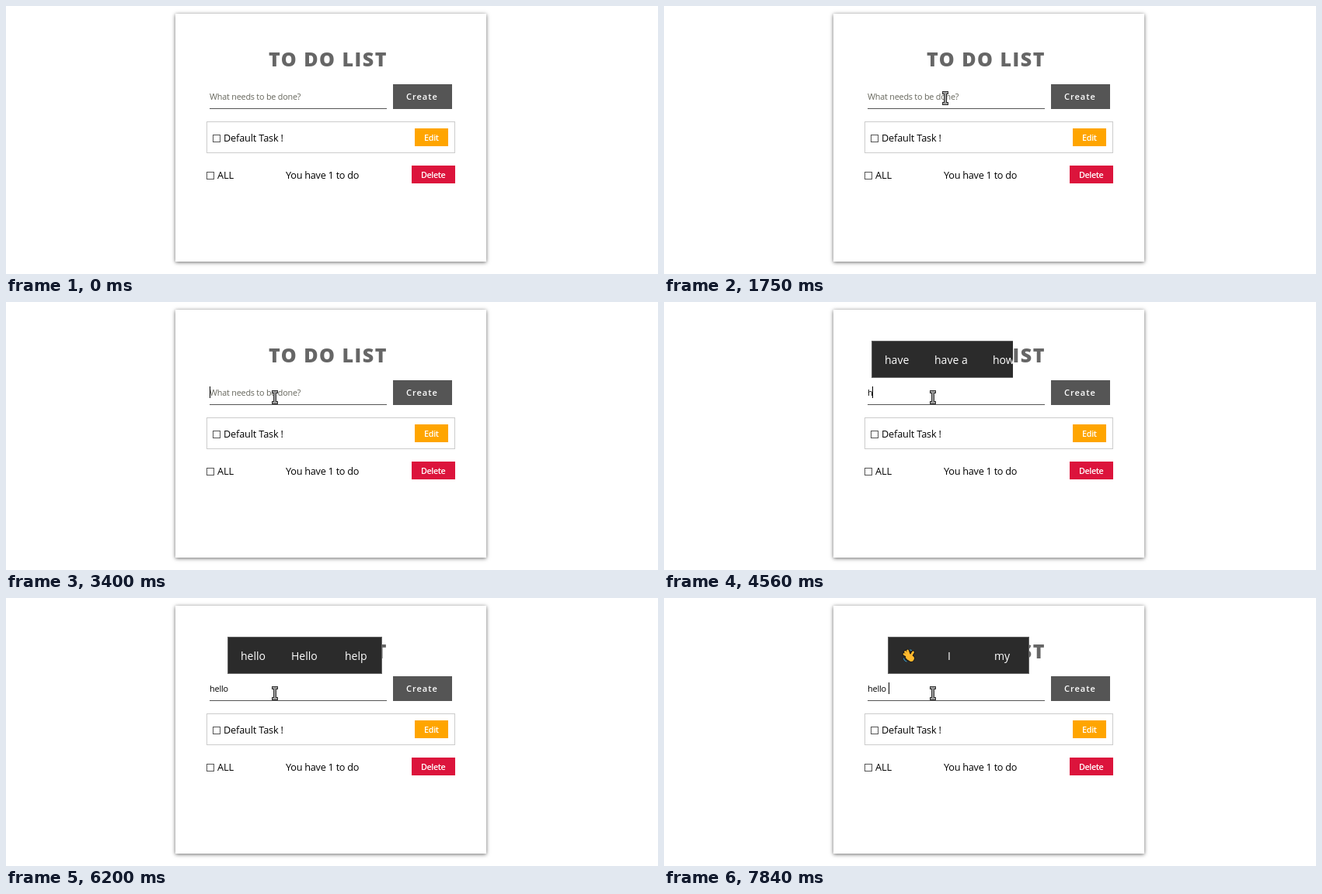
An HTML page with a canvas that plays this animation: 839x346 px, repeating every 8 s.

```html
<!DOCTYPE html>
<html lang="en">
<head>
<meta charset="utf-8">
<title>To do list</title>
<style>
  html, body { margin: 0; width: 100%; height: 100%; overflow: hidden; background: #fff; }
  canvas { display: block; width: 839px; height: 346px; }
</style>
</head>
<body>
<canvas id="stage"></canvas>
<script>
const W = 839, H = 346, LOOP = 8000;
const FONT = '"Open Sans", "Noto Sans", sans-serif';
const INPUT_X = 262;
const canvas = document.getElementById('stage');
const ctx = canvas.getContext('2d');
const scale = window.devicePixelRatio || 1;
canvas.width = W * scale;
canvas.height = H * scale;

function rect(x, y, w, h, color) {
  ctx.fillStyle = color;
  ctx.fillRect(x, y, w, h);
}

function frame(x, y, w, h, color) {
  ctx.strokeStyle = color;
  ctx.lineWidth = 1;
  ctx.strokeRect(x + 0.5, y + 0.5, w - 1, h - 1);
}

function setFont(size, weight, spacing) {
  ctx.font = `${weight} ${size}px ${FONT}`;
  ctx.letterSpacing = spacing + 'px';
}

function text(str, x, y, size, color, weight = 400, spacing = 0) {
  setFont(size, weight, spacing);
  ctx.fillStyle = color;
  ctx.fillText(str, x, y);
}

function line(points, width, color) {
  ctx.strokeStyle = color;
  ctx.lineWidth = width;
  ctx.lineCap = ctx.lineJoin = 'round';
  ctx.beginPath();
  points.forEach(([x, y]) => ctx.lineTo(x, y));
  ctx.stroke();
}

// Last entry of a [time, value] list that has started.
function at(list, t) {
  let value = list[0][1];
  for (const [start, v] of list) if (t >= start) value = v;
  return value;
}

function drawCard() {
  ctx.save();
  ctx.shadowColor = 'rgba(0,0,0,0.6)';
  ctx.shadowBlur = 5 * scale;
  ctx.shadowOffsetY = scale;
  rect(218, 10, 400, 320, '#fff');
  ctx.restore();

  text('TO DO LIST', 338, 78, 25, '#666', 800, 1.5);
  rect(262, 132, 228, 1, '#555');
  rect(498, 101, 76, 32, '#555');
  text('Create', 515, 121, 11, '#fff', 600, 1);

  frame(258, 149, 320, 41, '#ccc');
  frame(266, 166, 10, 10, '#555');
  text('Default Task !', 280, 175, 12.7, '#000', 400, -0.15);
  rect(526, 158, 43, 23, '#ffa500');
  text('Edit', 538, 174, 10.8, '#fff', 600, -0.3);

  frame(258, 214, 10, 10, '#555');
  text('ALL', 272, 223, 12.7, '#000', 400, -0.1);
  text('You have 1 to do', 360, 223, 12.7, '#000', 400, -0.25);
  rect(522, 206, 56, 23, '#dc143c');
  text('Delete', 534, 222, 10.8, '#fff', 600, -0.4);
}

const typed = [[0, ''], [4160, 'h'], [4860, 'he'], [5180, 'hel'], [5350, 'hell'], [5650, 'hello'], [6750, 'hello ']];
const caret = [[0, 0], [2300, 1], [2850, 0], [3400, 1], [3860, 0], [4160, 1], [4710, 0], [4860, 1],
  [6200, 0], [6750, 0.7], [7290, 0], [7840, 1]];

function drawInput(t) {
  const value = at(typed, t);
  if (value) text(value, INPUT_X, 121, 10.8, '#000', 400, -0.15);
  else text('What needs to be done?', INPUT_X, 121, 10.8, '#66665c', 400, -0.2);

  setFont(10.8, 400, -0.15);
  const x = Math.round(INPUT_X + ctx.measureText(value).width);
  rect(x, 109, 1, 15, `rgba(0,0,0,${at(caret, t)})`);
}

function wave() {
  const fingers = [[309, 72.5], [310.5, 69.5], [313.5, 68], [320.5, 70]];
  for (const [width, color] of [[4.4, '#111'], [2.8, '#ffb92e']]) {
    for (const tip of fingers) line([[316.5, 76.5], tip], width, color);
    line([[315, 76], [318, 78]], width + 5, color);
  }
  line([[308.5, 78], [309.5, 80.5], [312, 82]], 1, '#35a7e0');
  line([[316.5, 67], [318.5, 67.5]], 1, '#35a7e0');
}

// Each popup: left edge, [time, width, opacity] steps and its words with x positions.
const popups = [
  { x: 267, end: 5350, steps: [[4560, 182, 1], [4635, 196, 1], [4710, 202, 1]],
    words: [['have', 284], ['have a', 348], ['how', 423]] },
  { x: 285, end: 6820, steps: [[6120, 180, 1], [6200, 199, 1], [6750, 199, 0.5]],
    words: [['hello', 302], ['Hello', 367], ['help', 436]] },
  { x: 288, end: LOOP, steps: [[7220, 164, 1], [7290, 182, 1]],
    words: [['I', 365], ['my', 425]], icon: wave }
];

function drawPopup(t) {
  const p = popups.find(p => t >= p.steps[0][0] && t < p.end);
  if (!p) return;
  const [, w, alpha] = at(p.steps.map(s => [s[0], s]), t);
  const full = Math.max(...p.steps.map(s => s[1]));
  ctx.save();
  ctx.globalAlpha = alpha;
  ctx.beginPath();
  ctx.rect(p.x, 50, w, 48);
  ctx.clip();
  rect(p.x, 50, full, 48, '#2b2b2b');
  frame(p.x, 50, full, 48, '#636363');
  for (const [word, x] of p.words) text(word, x, 80, 14, '#fff');
  if (p.icon) p.icon();
  ctx.restore();
}

function arrow(x, y) {
  const shape = [[0, 0], [0, 16], [4, 12.5], [6.5, 18], [9, 17], [6.5, 11.5], [11.5, 11.5]];
  ctx.beginPath();
  shape.forEach(([dx, dy]) => ctx.lineTo(x + 0.5 + dx, y + 0.5 + dy));
  ctx.closePath();
  ctx.fillStyle = '#fff';
  ctx.fill();
  ctx.strokeStyle = '#000';
  ctx.lineWidth = 1;
  ctx.lineJoin = 'miter';
  ctx.stroke();
}

function beam(cx, cy) {
  const x = Math.round(cx), y = Math.round(cy);
  for (const [inset, color] of [[0, '#2e2e2e'], [1, '#a0a0a0']]) {
    const d = 2 * inset;
    rect(x - 4 + inset, y - 9 + inset, 8 - d, 4 - d, color);
    rect(x - 4 + inset, y + 5 + inset, 8 - d, 4 - d, color);
    rect(x - 2 + inset, y - 9 + inset, 4 - d, 18 - d, color);
  }
}

// Pointer progress advances in discrete steps, as sampled by the recorder.
function progress(t, start, gap, count) {
  return Math.max(0, Math.min(count, Math.floor((t - start) / gap) + 1)) / count;
}

function drawPointer(t) {
  if (t < 210) return;
  if (t < 285) return arrow(588, 223);
  if (t < 360) return arrow(540, 140);
  if (t >= 2150) return beam(346, 123);
  const a = progress(t, 760, 76, 11);
  const b = progress(t, 1600, 75, 6) ** 1.8;
  beam(488 - 121 * a - 18 * b, 79 + 38 * a + 3 * Math.sqrt(b) + 2 * b);
}

function draw(now) {
  const t = now % LOOP;
  ctx.setTransform(scale, 0, 0, scale, 0, 0);
  rect(0, 0, W, H, '#fff');
  drawCard();
  drawInput(t);
  drawPopup(t);
  drawPointer(t);
}

const begin = performance.now();
function tick() {
  draw(performance.now() - begin);
  requestAnimationFrame(tick);
}
tick();
</script>
</body>
</html>
```
